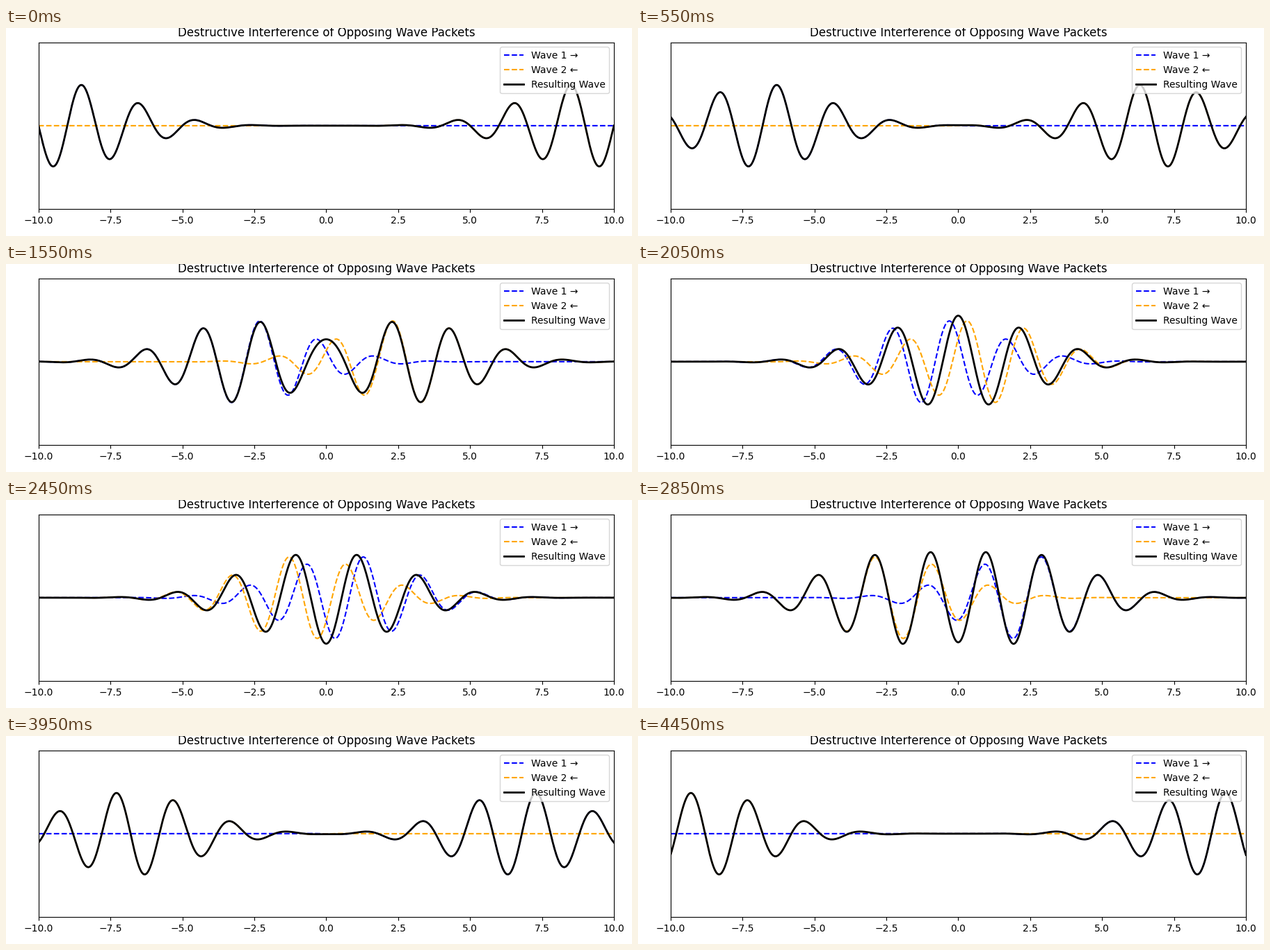
A matplotlib script for the animation above (4500 ms loop, 900 by 300 pixels).

```python
import numpy as np
import matplotlib.pyplot as plt
from matplotlib.animation import FuncAnimation

FRAMES = 90
INTERVAL = 50      # ms per frame
START = -9.0       # packet centre at the first frame
STEP = 0.2         # distance travelled per frame

x = np.linspace(-10, 10, 1000)


def packet(u):
    """Sine carrier under a Gaussian envelope, centred on u = 0."""
    return np.exp(-0.1 * u**2) * np.sin(np.pi * u)


fig, ax = plt.subplots(figsize=(9, 3), dpi=100)
fig.tight_layout()  # margins are fitted to the bare axes, before the title

ax.set_xlim(-10, 10)
ax.set_ylim(-2, 2)
ax.set_yticks([])
ax.set_title("Destructive Interference of Opposing Wave Packets")

right_going, = ax.plot([], [], "--", color="blue", label="Wave 1 →")
left_going, = ax.plot([], [], "--", color="orange", label="Wave 2 ←")
total, = ax.plot([], [], color="black", lw=2, label="Resulting Wave")
ax.legend(loc="upper right")


def update(frame):
    centre = START + STEP * frame
    y1 = packet(x - centre)
    y2 = packet(-x - centre)
    right_going.set_data(x, y1)
    left_going.set_data(x, y2)
    total.set_data(x, y1 + y2)
    return right_going, left_going, total


anim = FuncAnimation(fig, update, frames=FRAMES, interval=INTERVAL,
                     repeat=True, repeat_delay=0)
plt.show()
```
